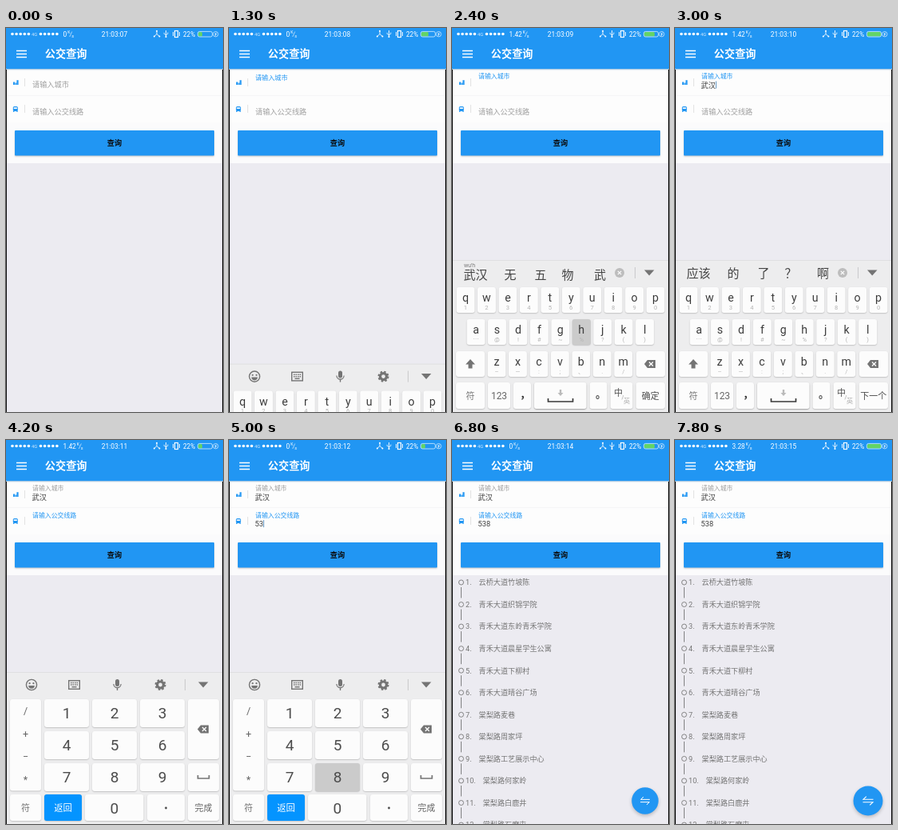
An HTML page with a canvas that plays this animation: 272x480 px, repeating every 8000 ms.

```html
<!DOCTYPE html>
<html lang="zh">
<head>
<meta charset="utf-8">
<title>公交查询</title>
<style>
html, body { margin: 0; width: 272px; height: 480px; overflow: hidden; }
canvas { display: block; }
</style>
</head>
<body>
<canvas id="stage" width="272" height="480"></canvas>
<script>
const LOOP = 8000;
const BLUE = '#2196f3', GRAY = '#9f9f9f', ICON = '#747474', INK = '#4c4c4c';
const FONT = 'Roboto, "Noto Sans CJK SC", "Noto Sans CJK", sans-serif';
const c = document.getElementById('stage').getContext('2d');

const STOPS = ['云桥大道竹坡陈', '青禾大道织锦学院', '青禾大道东岭青禾学院', '青禾大道晨星学生公寓',
  '青禾大道下柳村', '青禾大道晴谷广场', '棠梨路麦巷', '棠梨路周家坪', '棠梨路工艺展示中心',
  '棠梨路何家岭', '棠梨路白鹿井', '棠梨路石磨屯'];
const CANDIDATES = ['我 为 无 ？ 问', '无 五 物 武 舞', '武汉 无 五 物 武', '武汉 无 五 物 武', '武汉 无憾 无 五 武'];
const ROWS = [['qwertyuiop', '1234567890', 17], ['asdfghjkl', '⋯@!#~%?()', 30], ['zxcvbnm', '–—:;、./', 56]];

const clamp = v => Math.max(0, Math.min(1, v));
const mix = (a, b, k) => a + (b - a) * k;
const easeOut = (t, from, to) => 1 - (1 - clamp((t - from) / (to - from))) ** 2;
const within = (t, from, to) => t >= from && t < to;

// y is the visual middle of the glyphs
function text(s, x, y, size, color, align = 'left', weight = 400) {
  c.font = `${weight} ${size}px ${FONT}`;
  c.textAlign = align;
  c.fillStyle = color;
  c.fillText(s, x, y + size * 0.37);
}
const mid = (s, x, y, size, color, weight) => text(s, x, y, size, color, 'center', weight);

function box(x, y, w, h, color, r = 0, shadow = 0) {
  c.save();
  if (shadow) {
    c.shadowColor = 'rgba(0,0,0,.22)';
    c.shadowBlur = shadow;
    c.shadowOffsetY = shadow / 2;
  }
  c.fillStyle = color;
  c.beginPath();
  c.roundRect(x, y, w, h, r);
  c.fill();
  c.restore();
}

function line(color, width, ...p) {
  c.strokeStyle = color;
  c.lineWidth = width;
  c.beginPath();
  for (let i = 0; i < p.length; i += 2) c.lineTo(p[i], p[i + 1]);
  c.stroke();
}

function fillPoly(color, ...p) {
  c.fillStyle = color;
  c.beginPath();
  for (let i = 0; i < p.length; i += 2) c.lineTo(p[i], p[i + 1]);
  c.fill();
}

function dot(x, y, r, color, to = 2 * Math.PI) {
  c.fillStyle = color;
  c.beginPath();
  c.arc(x, y, r, 0, to);
  c.fill();
}

function arc(x, y, r, color, width, from = 0, to = 2 * Math.PI) {
  c.strokeStyle = color;
  c.lineWidth = width;
  c.beginPath();
  c.arc(x, y, r, from, to);
  c.stroke();
}

function statusBar(t) {
  for (let i = 0; i < 5; i++) {
    dot(8 + i * 5.1, 7.5, 1.8, '#fff');
    dot(43.5 + i * 5.1, 7.5, 1.8, '#fff');
  }
  text('4G', 32, 8, 5.8, '#d6ebfc');
  const speed = t < 1700 ? '0' : t < 4700 ? '1.42' : t < 7700 ? '0' : '3.28';
  text(speed, 71.5, 7.5, 8.4, '#fff');
  const x = 71.5 + c.measureText(speed).width + 1;
  text('K', x, 5.5, 5, '#fff');
  line('#fff', 0.6, x + 2.5, 11, x + 5.5, 4.5);
  text('s', x + 5, 9.5, 5.5, '#fff');
  const second = 7 + Math.floor((t + 300) / 1000);
  mid('21:03:' + String(second).padStart(2, '0'), 136, 7.5, 8.4, '#fff');

  for (const [px, py] of [[189, 3.8], [185.8, 10.5], [192.4, 10.5]]) {
    line('#fff', 0.9, 189, 7.5, px, py);
    dot(px, py, 1, '#fff');
  }
  line('#fff', 0.9, 200.5, 3, 200.5, 11);
  line('#fff', 0.8, 198.2, 5.8, 198.2, 7.4, 200.5, 9, 202.8, 7.4, 202.8, 5.5);
  dot(200.5, 11, 1.1, '#fff');
  c.strokeStyle = '#fff';
  c.lineWidth = 1.2;
  c.strokeRect(211.5, 3.5, 4, 8);
  line('#fff', 0.9, 209.5, 5, 209.5, 10);
  line('#fff', 0.9, 217.5, 5, 217.5, 10);
  text('22%', 222, 7.5, 8.2, '#fff');

  const steps = [800, 1800, 2900, 3900, 5300, 6400, 7400].filter(s => t >= s).length;
  box(241, 5, [5, 9, 13, 17][steps % 4], 5.5, '#63d467', 1.5);
  c.strokeStyle = '#d9f0ff';
  c.lineWidth = 0.8;
  c.beginPath();
  c.roundRect(240.4, 4.4, 18.2, 6.6, 2.2);
  c.stroke();
  arc(262.8, 7.7, 3.2, '#e4f3ff', 0.7);
  line('#fff', 0.8, 263.4, 5.8, 262, 8, 263.6, 7.6, 262.2, 9.8);
}

function field(y, hint, floated, focused, value, cursor) {
  const color = focused ? BLUE : GRAY;
  text(hint, 33, mix(y, y - 10.8, floated), mix(9.2, 7.9, floated), color);
  text(value, 32.6, y + 0.3, 9.2, '#3a3a3a');
  if (cursor) {
    const x = Math.round(32.6 + c.measureText(value).width) + 0.5;
    line('#3f7fb5', 0.8, x, y - 4.5, x, y + 4.5);
  }
}

function form(t) {
  box(0, 52, 272, 117, '#fdfdfd');
  box(0, 118, 272, 51, '#fbfbfc');
  line('#f5f5f7', 1, 1, 84.5, 271, 84.5);
  box(0, 0, 272, 51, BLUE);
  box(0, 51, 272, 1, '#a9c9e2');
  box(0, 52, 272, 1, '#e6eef4');
  statusBar(t);
  for (const y of [28.5, 32.5, 36.5]) line('#fff', 1.5, 13, y, 26, y);
  text('公交查询', 48.8, 32.5, 13.2, '#fff', 'left', 700);

  box(9, 67.5, 2, 3.5, BLUE);
  box(11.5, 68.5, 1.8, 2.5, BLUE);
  box(13.4, 65.2, 2.2, 5.8, BLUE);
  box(8.8, 98, 6, 6, BLUE, 1.5);
  box(9.8, 99.3, 4, 1.7, '#fff');
  box(9, 103.5, 1.3, 1.5, BLUE);
  box(13.3, 103.5, 1.3, 1.5, BLUE);
  line('#dcdcdc', 0.8, 23.5, 63, 23.5, 73);
  line('#dcdcdc', 0.8, 23.5, 96, 23.5, 106);

  const second = t >= 3500;
  const city = t >= 3000 ? '武汉' : '';
  const route = '538'.slice(0, [4500, 4700, 5100].filter(s => t >= s).length);
  field(71, '请输入城市', easeOut(t, 1150, 1400), t >= 1200 && !second, city, within(t, 3000, 3500));
  field(104.6, '请输入公交线路', easeOut(t, 3450, 3700), second, route, within(t, 4500, 5600));

  box(11, 128, 250, 31.5, within(t, 5800, 6500) ? '#2c94e6' : BLUE, 1, 2);
  mid('查询', 136, 143.8, 9.2, '#0b0b0b', 700);
}

function results(t) {
  STOPS.forEach((name, i) => {
    const y = 178 + i * 27.55;
    arc(11.5, y, 3, '#777', 0.9);
    line('#777', 0.9, 11.5, y + 6, 11.5, y + 19.5);
    text(`${i + 1}.\u00a0\u00a0\u00a0\u00a0${name}`, 17, y, 9.15, '#757575');
  });
  c.save();
  c.translate(242, 451);
  const s = mix(0.4, 1, easeOut(t, 6650, 6900));
  c.scale(s, s);
  box(-18.5, -18.5, 37, 37, BLUE, 18.5, 4);
  line('#fff', 1.1, 6.5, -1.8, -6, -1.8, -2.2, -5.4);
  line('#fff', 1.1, -6.5, 1.8, 6, 1.8, 2.2, 5.4);
  c.restore();
}

function spinner(t) {
  const dt = t - 5900, deg = Math.PI / 180;
  const sweep = 150 + 120 * Math.cos(dt / 1333 * 2 * Math.PI - 0.9);
  const end = 180 + Math.min(dt, 600) * 0.6;
  arc(136, 325, 12.3, BLUE, 2.6, (end - sweep) * deg, end * deg);
}

function key(x, y, w, h, label, size, pressed, fill = '#fcfcfc', color = INK) {
  box(x, y, w, h, pressed ? '#cbcbcb' : fill, 3, 1.5);
  if (label) mid(label, x + w / 2, y + h / 2, size, color);
}

function backspace(x, y) {
  fillPoly(ICON, x - 7, y, x - 3, y - 5, x + 7, y - 5, x + 7, y + 5, x - 3, y + 5);
  line('#fff', 1.3, x - 1, y - 2.5, x + 4, y + 2.5);
  line('#fff', 1.3, x - 1, y + 2.5, x + 4, y - 2.5);
}

const spaceMark = (x, y, w, color) =>
  line(color, 1.7, x - w, y - 2.5, x - w, y + 1.5, x + w, y + 1.5, x + w, y - 2.5);

function toolbar() {
  arc(32, 306, 6.6, ICON, 1.4);
  dot(29.6, 304.2, 1.1, ICON);
  dot(34.4, 304.2, 1.1, ICON);
  dot(32, 307, 3.8, ICON, Math.PI);
  c.strokeStyle = ICON;
  c.lineWidth = 1.4;
  c.strokeRect(78.7, 300.7, 13.6, 10.6);
  for (let i = 0; i < 8; i++) box(81 + (i % 4) * 2.5, 302.8 + (i >> 2) * 2.5, 1.5, 1.5, ICON);
  box(82.5, 308, 6, 1.4, ICON);
  box(137, 299, 5, 9, ICON, 2.5);
  arc(139.5, 305, 4.6, ICON, 1.2, 0, Math.PI);
  line(ICON, 1.4, 139.5, 309.5, 139.5, 313);
  arc(193.5, 306, 4, ICON, 3.2);
  c.setLineDash([2.5, 2.21]);
  arc(193.5, 306, 6, ICON, 2);
  c.setLineDash([]);
}

function suggestions(words, pinyin) {
  const y = pinyin ? 308 : 306;
  if (pinyin) text(pinyin, 15, 296, 7, '#777');
  words.split(' ').forEach((word, i) => mid(word, [29.5, 73, 111, 145, 185.5][i], y, 15, '#444'));
  dot(210, 306, 6, '#bdbdbd');
  line('#fff', 1.2, 207.8, 303.8, 212.2, 308.2);
  line('#fff', 1.2, 207.8, 308.2, 212.2, 303.8);
}

function letters(t, typed) {
  const pressed = typed && (t - 2000) % 200 < 100 && t < 2900 ? 'wuhan'[typed - 1] : '';
  ROWS.forEach(([keys, marks, x0], row) => [...keys].forEach((ch, i) => {
    const x = x0 + i * 26.45, y = 324 + row * 40;
    key(x - 11.5, y, 23, 32, '', 0, ch === pressed);
    mid(ch, x, y + 13, 14.2, '#3c3c3c');
    mid(marks[i], x, y + 25, 7.6, '#b4b4b4');
  }));
  key(5, 404, 36, 32);
  fillPoly(ICON, 23, 414, 29, 420.5, 25.5, 420.5, 25.5, 425.5, 20.5, 425.5, 20.5, 420.5, 17, 420.5);
  key(231, 404, 36, 32);
  backspace(248, 420);

  const busy = within(t, 2000, 3500);
  const last = within(t, 2000, 3000) ? '确定' : t < 3500 ? '下一个' : '完成';
  key(5, 443, 36, 33, '符', 11, false, undefined, '#777');
  key(45, 443, 28, 33, '123', 12, within(t, 4100, 4200), undefined, '#666');
  key(77, 443, 22, 33);
  text('，', 85, 457, 13, '#333', 'left', 700);
  key(103, 443, 65.5, 33, busy ? '' : '拼音', 0);
  if (busy) {
    key(103, 443, 65.5, 33, '', 0, within(t, 2900, 3000));
    spaceMark(136, 465.5, 15.5, '#3a3a3a');
    fillPoly('#bbb', 132.5, 456, 139.5, 456, 136, 460);
    box(134.8, 452, 2.4, 4, '#bbb');
  } else {
    mid('拼音', 136, 459.5, 11.3, '#2a2a2a', 700);
  }
  key(172.5, 443, 22, 33);
  text('。', 180, 457, 13, '#444', 'left', 700);
  key(198.5, 443, 28, 33);
  mid('中', 208.5, 455.5, 11, '#555');
  mid('/', 214, 461, 7, '#999');
  mid('英', 219, 466, 8.5, '#b4b4b4');
  key(230.5, 443, 36.5, 33, last, 11, within(t, 3400, 3500));
}

function numbers(t) {
  const pressed = within(t, 4400, 4500) ? 5 : within(t, 4600, 4700) ? 3 : within(t, 5000, 5100) ? 8 : 0;
  key(5, 324, 39, 114.5);
  ['/', '+', '−', '*'].forEach((s, i) => mid(s, 24.5, 338.5 + i * 28.5, 12.5, '#666'));
  for (let n = 1; n < 10; n++) {
    const i = n - 1, x = 48 + (i % 3) * 60, y = 324 + Math.floor(i / 3) * 40;
    key(x, y, 56, 35, '', 0, n === pressed);
    mid(n, x + 28, y + 17, 19, INK);
  }
  key(228, 324, 39, 75);
  backspace(247, 361.5);
  key(228, 404, 39, 35);
  spaceMark(247.5, 421.5, 7, ICON);
  key(5, 443, 39, 33, '符', 11, false, undefined, '#777');
  key(48, 443, 47, 33, '返回', 11.3, false, '#0494ff', '#fff');
  key(99, 443, 73.5, 33, '0', 19);
  key(177, 443, 47, 33);
  dot(200.5, 460, 1.4, INK);
  key(228, 443, 39, 33, '完成', 11, false, undefined, '#666');
}

function keyboard(t) {
  const shown = t < 4000 ? easeOut(t, 1200, 1780) : 1 - clamp((t - 5530) / 320);
  if (shown <= 0) return;
  c.save();
  c.translate(0, 190 * (1 - shown));
  box(0, 291, 272, 189, '#ededee');
  line('#dfdfe1', 1, 0, 290.5, 272, 290.5);
  const typed = within(t, 2000, 3000) ? Math.min(5, Math.floor((t - 2000) / 200) + 1) : 0;
  if (typed) suggestions(CANDIDATES[typed - 1], ['w', 'wu', "wu'h", "wu'ha", "wu'han"][typed - 1]);
  else if (within(t, 3000, 3500)) suggestions('应该 的 了 ？ 啊');
  else toolbar();
  const divider = within(t, 2000, 3500) ? 229.5 : 224.5;
  line('#c9c9cb', 1, divider, 299, divider, 313);
  fillPoly(ICON, 241, 302.5, 253.5, 302.5, 247.2, 309.5);
  if (t < 4200) letters(t, typed); else numbers(t);
  c.restore();
}

function draw(t) {
  box(0, 0, 272, 480, '#ecebf1');
  if (t >= 6700) results(t);
  form(t);
  if (within(t, 5800, 6700)) spinner(t);
  keyboard(t);
  box(0, 52, 1, 428, '#111');
  box(271, 52, 1, 428, '#111');
}

function tick(now) {
  draw(now % LOOP);
  requestAnimationFrame(tick);
}
requestAnimationFrame(tick);
</script>
</body>
</html>
```
